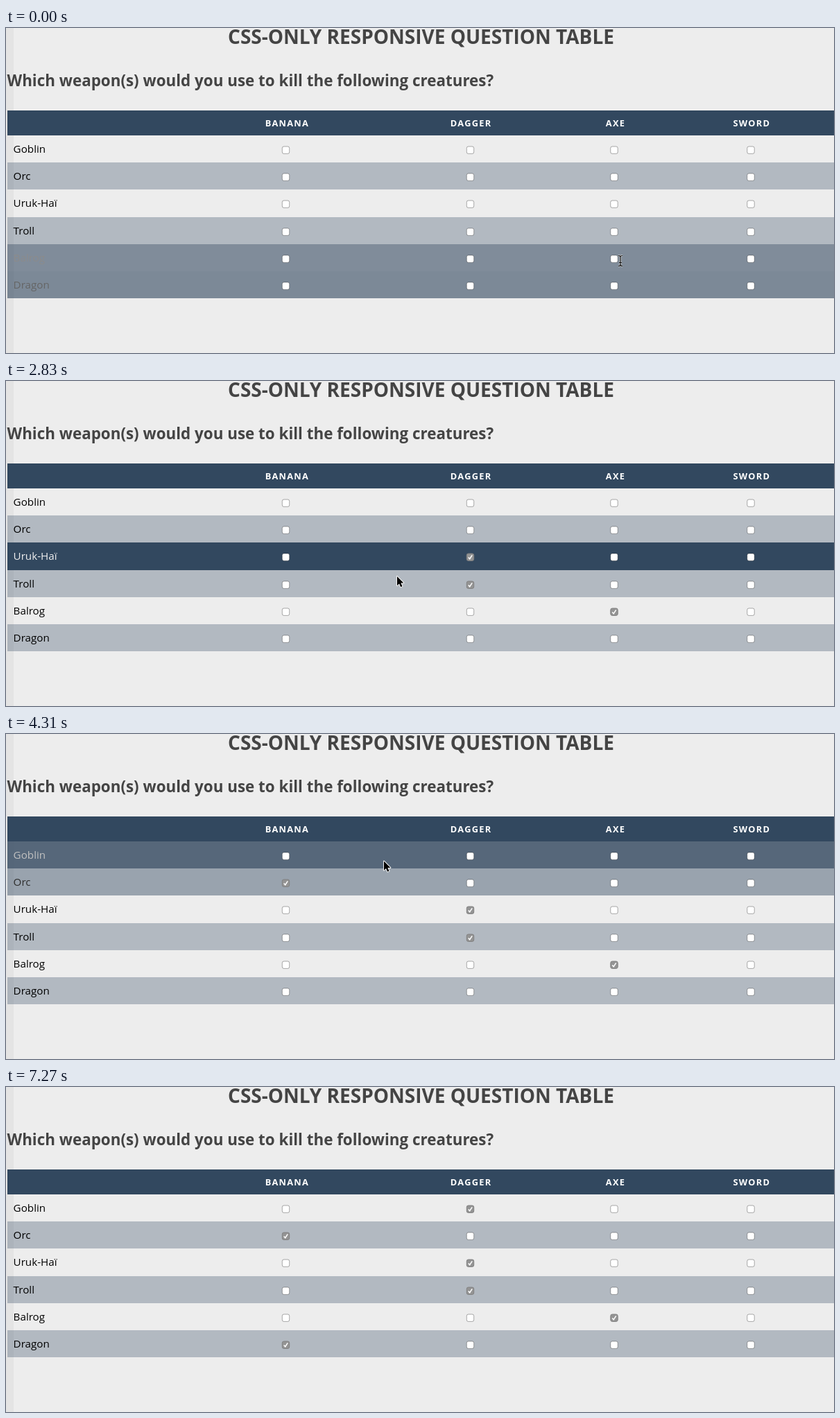
Write an HTML page that moves like this. It is 1194x469 px and loops after 8 s.

```html
<!DOCTYPE html>
<html lang="en">
<head>
<meta charset="utf-8">
<title>Question table</title>
<style>
  html, body { margin: 0; width: 100%; height: 100%; overflow: hidden; background: #ededed; }
  svg { display: block; width: 1194px; height: 469px; font-family: "Open Sans", sans-serif; }
  .title { font: 700 28px "Open Sans", sans-serif; fill: #444; text-anchor: middle; }
  .question { font: 700 22.4px "Open Sans", sans-serif; fill: #444; }
  .head { font: 700 12.8px "Open Sans", sans-serif; letter-spacing: .1em; fill: #fff; }
  .label { font-size: 15.2px; }
  .box rect { fill: #fff; stroke: #000; stroke-opacity: .32; }
  .box path { fill: none; stroke: #fff; stroke-width: 1.5; visibility: hidden; }
  .box.checked rect { fill: #949494; stroke: #808080; stroke-opacity: 1; }
  .box.checked path { visibility: visible; }
  .cursor { stroke-linejoin: round; }
</style>
</head>
<body>
<svg id="stage" viewBox="0 0 1194 469">
  <rect width="1194" height="469" fill="#ededed"/>
  <rect width="11" height="469" fill="#e4e4e4"/>
  <text class="title" x="598.5" y="23">CSS-ONLY RESPONSIVE QUESTION TABLE</text>
  <text class="question" x="1.5" y="84">Which weapon(s) would you use to kill the following creatures?</text>
  <rect x="2" y="119" width="1192" height="36" fill="#32485f"/>
  <g id="table"></g>
  <g id="arrow" class="cursor">
    <path d="M0 0V13.2L3 10.4L5.2 15.2L7.5 14.2L5.4 9.5H9.4Z" fill="#000" stroke="#fff" stroke-width="1.8" paint-order="stroke"/>
  </g>
  <g id="hand" class="cursor">
    <path d="M-1.6 1C-1.4-.8 1-.8 1.4 1L2.4 5C3.2 4.2 4.6 4.4 5 5.4C6 4.8 7 5.2 7.4 6.2C8.6 5.8 9.4 6.6 9.5 7.8C9.7 10 9 12 8 14.6H1.8C.8 12.4-1.6 10.6-3 8.6C-3.6 7.2-1.8 6.6-.4 8Z" fill="#fff" stroke="#000" stroke-width="1.1"/>
    <path d="M3 10V12.6M5 10V12.6M7 10V12.6" stroke="#000" stroke-width=".8"/>
  </g>
  <g id="beam" class="cursor" fill="none">
    <path id="beamShape" d="M-3-7.5Q0-7.5 0-5.5Q0-7.5 3-7.5M0-5.5V5.5M-3 7.5Q0 7.5 0 5.5Q0 7.5 3 7.5M-2 2.5H2" stroke="#ddd" stroke-width="2.6" stroke-opacity=".6"/>
    <use href="#beamShape" style="stroke:#111;stroke-width:1.2"/>
    <path d="M-3-7.5Q0-7.5 0-5.5Q0-7.5 3-7.5M0-5.5V5.5M-3 7.5Q0 7.5 0 5.5Q0 7.5 3 7.5M-2 2.5H2" stroke="#111" stroke-width="1.2"/>
  </g>
</svg>
<script>
const LOOP = 8000, STEP = 148.4, FADE = 2;   // times below are counted in steps
const ROW_TOP = 155, ROW_HEIGHT = 39.17;
const creatures = ['Goblin', 'Orc', 'Uruk-Haï', 'Troll', 'Balrog', 'Dragon'];
const weapons = [['BANANA', 373.8, 403.5], ['DAGGER', 640.8, 669.5], ['AXE', 864.8, 877], ['SWORD', 1048.4, 1074]];

// [row under the pointer, from step]; -1 is no row
const hovers = [[5, -9], [4, -.67], [3, 6.9], [2, 13], [3, 19], [2, 21.2], [1, 23.68], [0, 28],
  [1, 35.4], [-1, 35.5], [2, 35.68], [3, 35.78], [4, 35.94], [5, 36.5], [-1, 46.9]];

// [row, column, step of the click]
const clicks = [[4, 2, 3], [3, 1, 10], [2, 1, 15], [1, 0, 27], [0, 1, 32], [5, 0, 43]];

// [step, x, y, pointer shape from here on]
const poses = [
  [0, 886, 336, 'beam'], [1, 880, 333, 'hand'], [3, 877, 332, 'hand'], [4, 877, 332, 'hand'],
  [5, 868, 333, 'arrow'], [7, 765, 308, 'arrow'], [9, 672, 293, 'hand'], [11, 672, 293, 'hand'],
  [12, 675, 284, 'arrow'], [13, 675, 265, 'arrow'], [14, 672, 254, 'hand'], [16, 672, 254, 'hand'],
  [17, 655, 262, 'arrow'], [19, 564, 282, 'arrow'], [20, 505, 290, 'arrow'], [24, 394, 219.5, 'arrow'],
  [25, 403, 214, 'hand'], [27, 403, 214, 'hand'], [28, 450, 190, 'arrow'], [30, 640, 177, 'arrow'],
  [31, 670, 175, 'hand'], [33, 670, 175, 'hand'], [34, 662, 178, 'arrow'], [35, 615, 186, 'arrow'],
  [36, 497, 325, 'arrow'], [37, 430, 360, 'arrow'], [39, 406, 370, 'hand'], [41, 404, 370, 'hand'],
  [46, 404, 370, 'hand'], [47, 408, 394, 'arrow'], [48, 420, 440, 'arrow'], [49, 430, 490, 'none']];

const byId = id => document.getElementById(id);

function rowMarkup(name, i) {
  const top = Math.round(ROW_TOP + i * ROW_HEIGHT);
  const height = Math.round(ROW_TOP + (i + 1) * ROW_HEIGHT) - top;
  const boxes = weapons.map(([, , x]) => `<g class="box" transform="translate(${x} ${top + 21.2})">
    <rect x="-5.2" y="-5.2" width="10.4" height="10.4" rx="2.4"/><path d="M-2.8 .3L-.8 2.5L2.7-2.8"/></g>`);
  return `<g class="row"><rect x="2" y="${top}" width="1192" height="${height}" fill="#32485f"/>
    <text class="label" x="10.6" y="${top + 25}">${name}</text>${boxes.join('')}</g>`;
}

byId('table').innerHTML =
  weapons.map(([name, x]) => `<text class="head" x="${x}" y="142">${name}</text>`).join('') +
  creatures.map(rowMarkup).join('');

const rows = [...document.querySelectorAll('.row')].map(row => ({
  fill: row.querySelector('rect'),
  label: row.querySelector('text'),
  boxes: row.querySelectorAll('.box')
}));

// The CSS "ease" curve, cubic-bezier(.25, .1, .25, 1)
function ease(x) {
  if (x <= 0) return 0;
  if (x >= 1) return 1;
  const bezier = (u, a, b) => 3 * a * u * (1 - u) ** 2 + 3 * b * u * u * (1 - u) + u ** 3;
  let low = 0, high = 1;
  for (let i = 0; i < 20; i++) {
    const mid = (low + high) / 2;
    if (bezier(mid, .25, .25) < x) low = mid; else high = mid;
  }
  return bezier(low, .1, 1);
}

function highlight(row, step) {
  let sum = 0;
  hovers.forEach(([hovered, start], i) => {
    if (hovered !== row) return;
    const end = hovers[i + 1][1];
    sum += ease((Math.min(step, end) - start) / FADE) * (1 - ease((step - end) / FADE));
  });
  return Math.min(sum, 1);
}

function drawCursor(step) {
  const next = poses.findIndex(pose => pose[0] > step);
  const from = poses[next < 0 ? poses.length - 1 : next - 1];
  const to = next < 0 ? from : poses[next];
  const part = to === from ? 0 : (step - from[0]) / (to[0] - from[0]);
  const at = axis => from[axis] + (to[axis] - from[axis]) * part;
  for (const shape of ['arrow', 'hand', 'beam']) {
    const cursor = byId(shape);
    cursor.style.display = shape === from[3] ? '' : 'none';
    cursor.setAttribute('transform', `translate(${at(1)} ${at(2)})`);
  }
}

function draw() {
  const step = Math.floor((performance.now() % LOOP + 8) / STEP);
  rows.forEach(({ fill, label }, i) => {
    const amount = highlight(i, step);
    const base = i % 2 ? .315 : 0;
    const shade = Math.round(240 * amount);
    fill.setAttribute('fill-opacity', base + (1 - base) * amount);
    label.setAttribute('fill', `rgb(${shade},${shade},${shade})`);
  });
  for (const [row, column, when] of clicks)
    rows[row].boxes[column].classList.toggle('checked', step >= when);
  drawCursor(step);
  requestAnimationFrame(draw);
}
draw();
</script>
</body>
</html>
```
